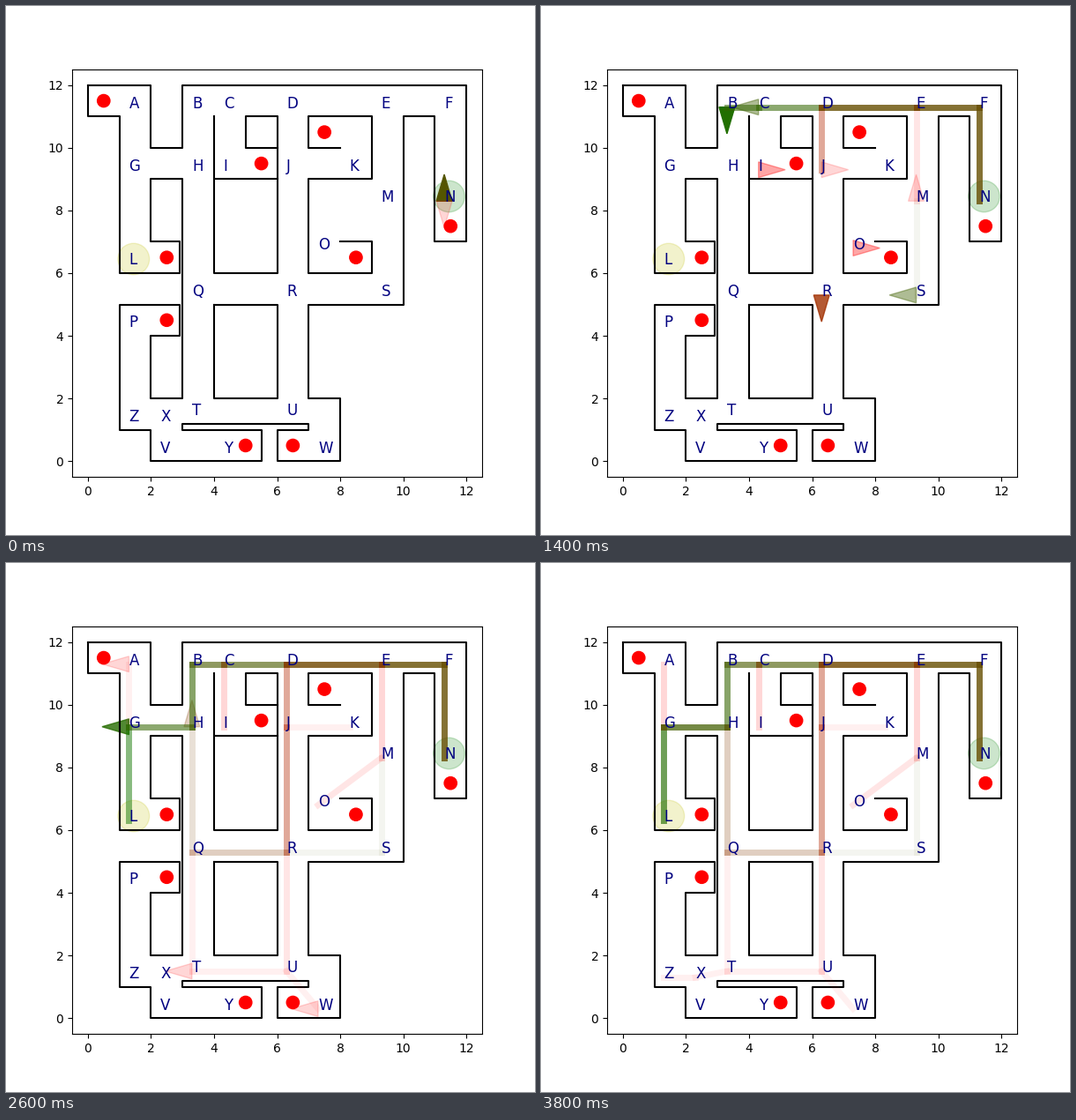
Animation, 600 px wide and 600 px high, one loop 4000 ms. Source, as a matplotlib script:

```python
import matplotlib.pyplot as plt
from matplotlib.animation import FuncAnimation
from matplotlib.patches import Circle, Polygon

FRAMES, STEP = 20, 200

# Right-angled walls: x and y alternate, each value turns one corner.
WALLS = [
    [0, 12, 2, 10, 3, 12, 12, 7, 11, 11, 10, 5, 7, 2, 8, 0, 6, 1, 7, 1.2, 3, 1,
     5.5, 0, 2, 1, 1, 5, 2.9, 4, 2, 2, 3, 9, 2, 7, 2.9, 6, 1, 11, 0, 12],
    [4, 11, 4, 6, 6, 11, 5, 10, 6],
    [4, 9, 6],
    [4, 5, 6, 2, 4, 5],
    [8, 10, 7, 11, 9, 9, 7, 6, 9, 7, 8],
]
DOTS = [(0.5, 11.5), (7.5, 10.5), (5.5, 9.5), (11.5, 7.5), (2.5, 6.5),
        (8.5, 6.5), (2.5, 4.5), (5, 0.5), (6.5, 0.5)]

# Junctions by height; the place in the string is the column.
MAP = {
    11.3: " A BC D  E F",
    9.3: " G HI J K",
    8.3: "         M N",
    6.8: "       O",
    6.3: " L",
    5.3: "   Q  R  S",
    4.3: " P",
    1.5: "   T  U",
    1.3: " ZX",
    0.3: "  V Y  W",
}
NODES = {c: (x + 0.3, y) for y, row in MAP.items()
         for x, c in enumerate(row) if c != " "}
HEADING = {"^": (0, 1), "v": (0, -1), "<": (-1, 0), ">": (1, 0)}

# Greenness, arrow alpha, trail alpha
LOOKS = {
    "olive": (0.67, 1, 0.8),
    "green": (0.87, 1, 0.57),
    "goal": (1, 1, 0.5),
    "leaf": (0.85, 0.8, 0.3),
    "rust": (0.37, 0.8, 0.4),
    "moss": (0.75, 0.42, 0.06),
    "tan": (0.6, 0.7, 0.16),
    "faded": (0.48, 0.25, 0.1),
    "red": (0, 0.35, 0.1),
    "pink": (0, 0.16, 0.06),
}

# Look, first step, one stop per step; no heading means no arrow.
WALKS = """
olive 0 N^ F^ F< E< D<
green 4 D C< B< Bv Hv H< G<
goal 10 G Gv Lv
rust 5 Dv Jv Rv
moss 5 M Sv S< R<
moss 6 D< C< B< Bv Hv H<
tan 8 R< Q< Q^ H
leaf 11 H^ H< G< Gv Lv
faded 9 Rv R< Q< Q^ H^ H< G<
faded 11 G^
red 4 Ev Mv M< O>
red 6 Cv I>
red 7 R Uv U>
red 10 W< W<
red 14 G A< A< A<
pink 0 Nv
pink 7 M^ E^ E< D< C< B<
pink 7 J> K> K>
pink 8 Cv I>
pink 9 R>
pink 10 Uv U< T<
pink 10 Uv U> W< W<
pink 10 Qv Tv T<
pink 11 Qv
pink 11 R<
pink 11 G A< A<
pink 13 T< T< X< X< Z
pink 14 R< R<
pink 14 H^ H<
pink 15 H^
pink 15 T<
pink 15 Q>
pink 16 G< G^
pink 18 H^
"""


def shade(g):
    g = max(g, 0)
    return 1 - g, g / 2, 0


def corners(wall):
    pairs = enumerate(zip(wall, wall[1:]))
    return [p[::-1] if k % 2 else p for k, p in pairs]


def arrow(node, heading, color, alpha, half=0.25, length=0.85):
    """Triangle standing on a junction."""
    (x, y), (dx, dy) = NODES[node], HEADING[heading]
    pts = [(x - dy * half, y + dx * half), (x + dx * length, y + dy * length),
           (x + dy * half, y - dx * half)]
    return ax.add_patch(Polygon(pts, color=color, alpha=alpha, visible=False))


fig, ax = plt.subplots(figsize=(6, 6), dpi=100)
ax.set_xlim(-0.5, 12.5)
ax.set_ylim(-0.5, 12.5)

for wall in WALLS:
    ax.plot(*zip(*corners(wall)), color="k", lw=1.5)
for dot in DOTS:
    ax.add_patch(Circle(dot, 0.2, color="r"))
for name, color in (("N", "g"), ("L", "y")):
    x, y = NODES[name]
    ax.add_patch(Circle((x + 0.15, y + 0.15), 0.5, color=color, alpha=0.2))
for name, (x, y) in NODES.items():
    ax.text(x, y - 0.03, name, fontsize=12, color="navy")

arrows, edges = [], []
for walk in WALKS.strip().splitlines():
    look, start, *stops = walk.split()
    start = int(start)
    g, alpha, trail = LOOKS[look]
    for k, stop in enumerate(stops, start):
        if len(stop) > 1:
            arrows.append((k, arrow(*stop, shade(g), alpha)))
    # A passage is marked one step after its end is reached.
    for k, (a, b) in enumerate(zip(stops, stops[1:]), start + 2):
        if a[0] != b[0]:
            edges.append((k, a[0], b[0], shade(g - 0.07), trail))

trails = []
for k, a, b, color, alpha in sorted(edges, key=lambda e: e[0]):
    line, = ax.plot(*zip(NODES[a], NODES[b]), color=color, alpha=alpha, lw=5,
                    visible=False)
    trails.append((k, line))


def update(i):
    for k, patch in arrows:
        patch.set_visible(k == i)
    for k, line in trails:
        line.set_visible(k <= i)
    return []


anim = FuncAnimation(fig, update, frames=FRAMES, interval=STEP, repeat=True,
                     repeat_delay=0)
plt.show()
```
